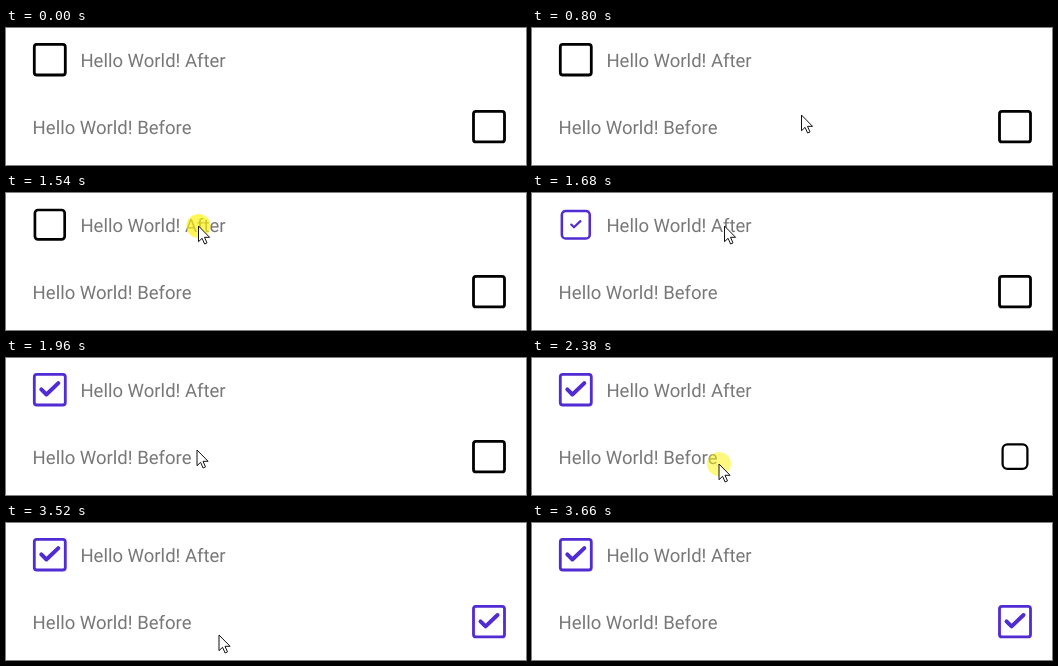
Write an HTML page that moves like this. It is 520x137 px and loops after 4.45 s.

```html
<!DOCTYPE html>
<html lang="en">
<head>
<meta charset="utf-8">
<title>Checkbox label position</title>
<style>
  html, body { margin: 0; width: 100%; height: 100%; overflow: hidden; background: #fff; }
  svg { display: block; width: 520px; height: 137px; }
  text { font: 18.55px Roboto, sans-serif; fill: #787878; text-rendering: geometricPrecision; }
  .box rect { fill: #fff; stroke-width: 2.8; }
  .box path { fill: none; stroke: #512bd4; stroke-width: 4; stroke-linecap: round; stroke-linejoin: round; }
</style>
</head>
<body>
<svg viewBox="0 0 520 137">
  <text x="74.4" y="38.5">Hello World! After</text>
  <text x="26.6" y="106.1">Hello World! Before</text>
  <g class="box" id="after"><rect x="-15.5" y="-15.3" width="31" height="30.6"/><path d="M-8.5-.3L-3.4 4.8L8.5-6.6"/></g>
  <g class="box" id="before"><rect x="-15.5" y="-15.3" width="31" height="30.6"/><path d="M-8.5-.3L-3.4 4.8L8.5-6.6"/></g>
  <circle id="glow" r="12" fill="#fff200"/>
  <path id="cursor" d="M0 0V15.7L3.6 12.3L6.1 18L8.5 16.9L6 11.3H11.1Z" fill="#fff" stroke="#111"/>
</svg>
<script>
const LOOP = 4450;
const FRAME = 70;
const $ = id => document.getElementById(id);
const cursor = $("cursor"), glow = $("glow");

// The pointer was sampled at a fixed rate, so its motion is stepped.
const progress = (t, from, to) => {
  const sampled = from + Math.floor((t - from) / FRAME) * FRAME;
  return Math.min(1, Math.max(0, (sampled - from) / (to - from)));
};
const mix = (a, b, p) => a + (b - a) * p;

function pointerAt(t) {
  if (t < 730 || t >= 3660) return null;
  if (t < 1150) {
    const rest = 1 - progress(t, 730, 1150);
    return [198 + 94 * rest ** 1.5, 19 + 98 * rest ** 2];
  }
  if (t < 1210) return [198, 19];
  if (t < 1280) return [195, 26];
  if (t < 1820) return [192.5, 33];
  if (t < 1960) {
    const p = progress(t, 1750, 1960);
    return [mix(192.5, 191, p), mix(33, 92, p)];
  }
  if (t < 3520) {
    const p = progress(t, 1960, 2310);
    return [mix(191, 187, p), mix(92, 106, p)];
  }
  return t < 3590 ? [213, 112] : [271, 129];
}

// Each press squeezes and rounds the box, then releases it checked.
function drawBox(id, x, y, t, keys) {
  const [scale, checked] = keys.reduce((now, [at, ...state]) => t >= at ? state : now, [1, 0]);
  const box = $(id), [frame, mark] = box.children;
  box.setAttribute("transform", `translate(${x} ${y}) scale(${scale})`);
  frame.setAttribute("rx", mix(2.5, 6, (1 - scale) / .2));
  frame.setAttribute("stroke", checked ? "#512bd4" : "#000");
  mark.setAttribute("transform", `scale(${checked})`);
  mark.setAttribute("visibility", checked ? "visible" : "hidden");
}

function place(el, point) {
  el.setAttribute("visibility", point ? "visible" : "hidden");
  if (point) el.setAttribute("transform", `translate(${point})`);
}

function render(t) {
  drawBox("after", 43.8, 31.7, t, [[1540, .96, 0], [1610, .82, 0], [1680, .9, .6], [1750, 1, .9], [1820, 1, 1]]);
  drawBox("before", 483, 98.6, t, [[2380, .8, 0], [2440, .88, .6], [2510, .97, .9], [2570, 1, 1]]);
  const point = pointerAt(t);
  const pressed = t >= 1470 && t < 1680 || t >= 2310 && t < 2510;
  const fading = t >= 1610 && t < 1680 || t >= 2380;
  glow.setAttribute("fill-opacity", fading ? .5 : .65);
  place(cursor, point);
  place(glow, pressed ? point : null);
}

const start = performance.now();
function tick() {
  render((performance.now() - start) % LOOP);
  requestAnimationFrame(tick);
}
render(0);
requestAnimationFrame(tick);
</script>
</body>
</html>
```
